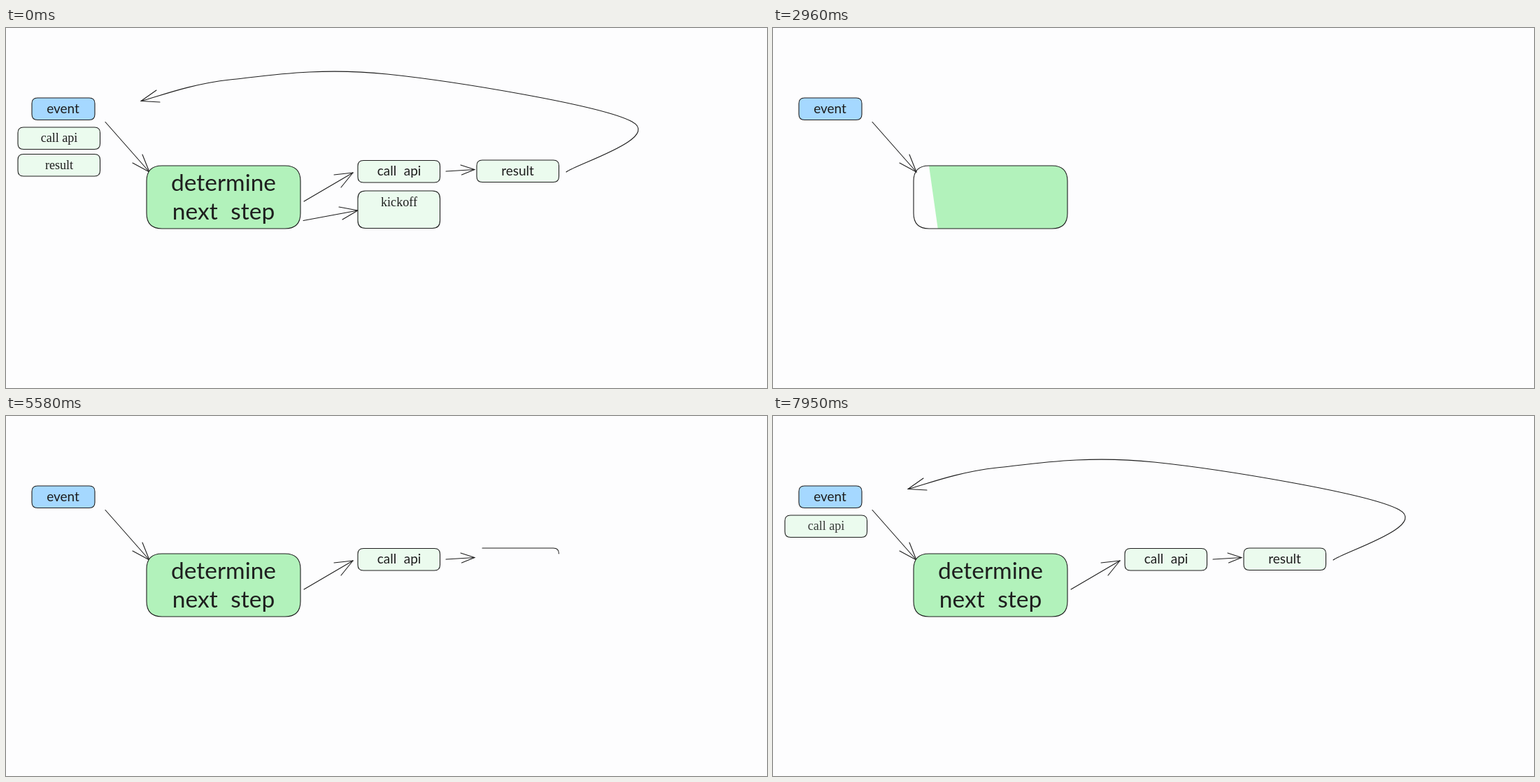
Write an HTML page with a canvas that moves like this. It is 1088x515 px and loops after 7990 ms.

```html
<!DOCTYPE html>
<html lang="en">
<head>
<meta charset="utf-8">
<title>Step loop</title>
<style>
  html, body { margin: 0; width: 100%; height: 100%; overflow: hidden; background: #fdfdfe; }
  canvas { display: block; }
</style>
</head>
<body>
<canvas id="stage" width="1088" height="515"></canvas>
<script>
const ctx = document.getElementById("stage").getContext("2d");
const LOOP = 7990, CLEAR_AT = 30, STEP = 500;
const INK = "#1e1e1e", BLUE = "#a5d8ff", GREEN = "#b2f2bb", PALE = "#ebfbee";
const HAND = "Lato, 'Open Sans', sans-serif";
const SERIF = "'Liberation Serif', serif";

const clamp = v => Math.max(0, Math.min(1, v));
const mix = (a, b, k) => a.map((v, i) => v + (b[i] - v) * k);

// Each segment takes an equal share of the progress and grows out of its start point.
function trace(start, segments, progress) {
  let from = start;
  ctx.beginPath();
  ctx.moveTo(...from);
  segments.forEach((points, i) => {
    const k = clamp(progress * segments.length - i);
    if (!k) return;
    const p = points.map(q => mix(from, q, k)).flat();
    if (p.length === 2) ctx.lineTo(...p);
    else if (p.length === 4) ctx.quadraticCurveTo(...p);
    else ctx.bezierCurveTo(...p);
    from = points[points.length - 1];
  });
}

function box(x, y, w, h, color, r = 8) {
  const R = x + w, B = y + h;
  const start = [x + r, y];
  const segments = [
    [[R - r, y]], [[R, y], [R, y + r]],
    [[R, B - r]], [[R, B], [R - r, B]],
    [[x + r, B]], [[x, B], [x, B - r]],
    [[x, y + r]], [[x, y], [x + r, y]]
  ];
  return p => {
    if (p > 0.75) {
      trace(start, segments, (p - 0.75) * 4);
      ctx.fillStyle = color;
      ctx.fill();
    }
    trace(start, segments, clamp(p / 0.75));
    ctx.stroke();
  };
}

// Lines of text fade in one after the other.
function label(x, baselines, lines, size, family = HAND) {
  return p => {
    ctx.font = `${size}px ${family}`;
    ctx.wordSpacing = family === HAND ? `${size * 0.3}px` : "0px";
    ctx.fillStyle = INK;
    lines.forEach((line, i) => {
      ctx.globalAlpha = clamp(p * lines.length - i);
      ctx.fillText(line, x, baselines[i]);
    });
    ctx.globalAlpha = 1;
  };
}

// Smooth curve through the points, as cubic segments.
function smooth(points) {
  const at = i => points[Math.max(0, Math.min(points.length - 1, i))];
  const handle = (i, sign) => at(i).map((v, k) => v + sign * (at(i + 1)[k] - at(i - 1)[k]) / 6);
  return points.slice(1).map((end, i) => [handle(i, 1), handle(i + 1, -1), end]);
}

function arrow(points, wings) {
  const segments = smooth(points);
  const tip = points[points.length - 1];
  return p => {
    trace(points[0], segments, clamp(p / 0.6));
    ctx.stroke();
    wings.forEach((wing, i) => {
      const k = clamp((p - 0.6 - i * 0.2) / 0.2);
      if (!k) return;
      trace(wing, [[tip]], k);
      ctx.stroke();
    });
  };
}

// [start time in ms, draw(progress)]; parts that start at Infinity only show before the clear.
const scene = [
  [1010, box(37, 100, 90, 31.5, BLUE)],
  [1510, label(81.5, [122], ["event"], 19)],
  [2008, arrow([[142, 134.5], [205, 206]], [[181, 193], [195, 181]])],
  [2509, box(201, 197, 220, 90, GREEN, 22)],
  [3005, label(311, [233, 274], ["determine", "next step"], 33.5)],
  [3510, arrow([[426, 248], [496, 207]], [[469, 210], [479, 228]])],
  [4010, box(503, 189.5, 117.5, 31.5, PALE)],
  [4510, label(562, [211], ["call api"], 19)],
  [5005, arrow([[629, 205], [670, 202.5]], [[650, 196], [651.5, 210]])],
  [5488, box(673, 189, 117.5, 31.5, PALE)],
  [6010, label(731.5, [210.5], ["result"], 19)],
  [6520, arrow([[801, 206], [895, 134], [545, 66], [320, 74], [193, 104.5]], [[215, 89], [220, 106]])],
  [7017, box(17, 142, 117.5, 31.5, PALE)],
  [7517, label(76, [163], ["call api"], 18.1, SERIF)],
  [Infinity, box(17, 180.5, 117.5, 31.5, PALE)],
  [Infinity, label(76, [201.5], ["result"], 18.1, SERIF)],
  [Infinity, arrow([[425, 275.5], [503, 261]], [[476, 256], [481, 274]])],
  [Infinity, box(503, 233, 117.5, 53.5, PALE, 11)],
  [Infinity, label(562, [254.5], ["kickoff"], 18.1, SERIF)]
];

function draw(time) {
  ctx.fillStyle = "#fdfdfe";
  ctx.fillRect(0, 0, 1088, 515);
  ctx.strokeStyle = INK;
  ctx.lineWidth = 1.1;
  ctx.lineCap = ctx.lineJoin = "round";
  ctx.textAlign = "center";
  for (const [start, paint] of scene) {
    const progress = time < CLEAR_AT ? 1 : clamp((time - start) / STEP);
    if (progress > 0) paint(progress);
  }
}

const origin = performance.now();
function tick() {
  draw((performance.now() - origin) % LOOP);
  requestAnimationFrame(tick);
}
tick();
</script>
</body>
</html>
```
